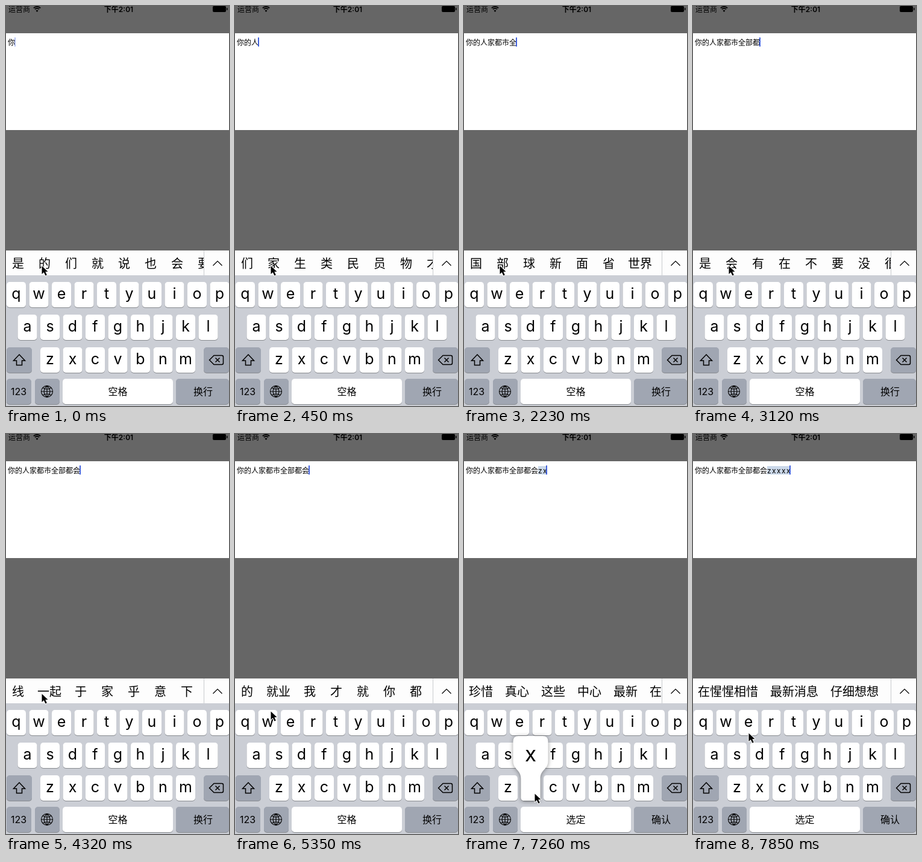
Write an HTML page with a canvas that moves like this. It is 370 by 661 pixels and loops after 8000 ms.

```html
<!DOCTYPE html>
<html lang="zh-CN">
<head>
<meta charset="utf-8">
<style>
html, body { margin: 0; width: 100%; height: 100%; overflow: hidden; background: #666; }
canvas { display: block; }
</style>
</head>
<body>
<canvas id="stage" width="370" height="661"></canvas>
<script>
const c = document.getElementById('stage').getContext('2d');
const LOOP = 8000;
const CJK = '"Noto Sans CJK SC", "Noto Sans CJK", sans-serif';
const LATIN = 'Inter, sans-serif';

// [time, committed characters, pinyin, candidates]
const PHRASE = '你的人家都市全部都会';
const typing = [
  [0, 1, '', '是 的 们 就 说 也 会 要'],
  [150, 2, '', '时候 人 心 话 手 事 家 生活'],
  [450, 3, '', '们 家 生 类 民 员 物 才'],
  [890, 4, '', '的 都 说 是 就 在 不 也'],
  [1190, 5, '', '会 市 江堰 匀 城 市报 灵'],
  [1790, 6, '', '的 全 里 中 生活 区 人'],
  [2080, 7, '', ''],
  [2230, 7, '', '国 部 球 新 面 省 世界'],
  [2680, 8, '', '的 都 是 人 在 内容 门'],
  [3120, 9, '', '是 会 有 在 不 要 没 很'],
  [3720, 10, '', '是 会 有 在 不 要 没 很'],
  [3870, 10, '', '的 在 有 是 被 让 不 很'],
  [4320, 10, '', '线 一起 于 家 乎 意 下'],
  [4610, 10, '', ''],
  [4760, 10, '', '的 就业 我 才 就 你 都'],
  [6820, 10, 'z', '在 这 中 只 最 做 怎么 真'],
  [7260, 10, 'zx', '珍惜 真心 这些 中心 最新 在下'],
  [7400, 10, 'zxx', '在学校 中学校 最新型 怎么写'],
  [7550, 10, 'zxxx', '最新消息 在线学习 仔细想想'],
  [7700, 10, 'zxxxx', '在惺惺相惜 最新消息 仔细想想']
];
// [time, x, y]
const pointer = [
  [0, 59, 429], [5210, 59, 458], [5360, 60, 520], [5500, 61, 580], [5650, 62, 612],
  [5790, 63, 621], [6090, 66, 614], [6240, 70, 598], [6530, 72, 591],
  [7110, 117, 594], [7850, 92, 494]
];
// [time, caret opacity]
const caret = [[0, .4], [150, 1], [5360, .4], [5790, 1], [6240, .4], [6530, 1], [6680, .4], [6820, 1]];
// [time, pressed key]
const pressed = [[0, ''], [6820, 'z'], [6970, ''], [7260, 'x'], [7850, '']];

const at = (list, t) => list.findLast(row => row[0] <= t);

function rect(x, y, w, h, fill) {
  c.fillStyle = fill;
  c.fillRect(x, y, w, h);
}

function text(s, x, y, size, family = CJK, align = 'center', weight = 400) {
  c.fillStyle = '#000';
  c.font = `${weight} ${size}px ${family}`;
  c.textAlign = align;
  c.fillText(s, x, y);
}

function stroke(d, width = 1.5) {
  c.strokeStyle = '#000';
  c.lineWidth = width;
  c.stroke(new Path2D(d));
}

function roundRect(x, y, w, h, r, fill) {
  c.fillStyle = fill;
  c.beginPath();
  c.roundRect(x, y, w, h, r);
  c.fill();
}

function key(x, y, w, fill = '#fff') {
  roundRect(x, y + 1, w, 42, 5, '#888b90');
  roundRect(x, y, w, 42, 5, fill);
}

function statusBar() {
  text('运营商', 4, 9.5, 12, CJK, 'left');
  text('下午2:01', 187, 9.5, 12, `Inter, ${CJK}`, 'center', 600);
  c.strokeStyle = '#000';
  c.lineWidth = 1.8;
  for (const r of [8, 5]) {
    c.beginPath();
    c.arc(51.5, 9, r, -Math.PI * .75, -Math.PI * .25);
    c.stroke();
  }
  c.fillStyle = '#000';
  c.fill(new Path2D('M51.5 10L49.5 7.6Q51.5 6 53.5 7.6Z'));
  roundRect(343, 0, 22, 10, 2, '#000');
  roundRect(366, 3, 1.5, 4, 1, '#000');
}

function field(t, count, pinyin) {
  rect(0, 45, 370, 160, '#fff');
  text(PHRASE.slice(0, count), 3, 64.5, 12, CJK, 'left');
  let end = 3 + count * 12;
  if (pinyin) {
    const w = pinyin.length * 8 - 2;
    rect(end, 53, w, 14, '#cbd8e9');
    [...pinyin].forEach((ch, i) => text(ch, end + i * 8, 64.5, 12, LATIN, 'left'));
    end += w;
  }
  c.globalAlpha = at(caret, t)[1];
  rect(end - 1, 52, 2, 15, '#4262dc');
  c.globalAlpha = 1;
}

function candidateBar(words) {
  rect(0, 404, 370, 41, '#fdfdfd');
  if (!words) return;
  c.save();
  c.beginPath();
  c.rect(0, 404, 328, 41);
  c.clip();
  let x = -2;
  for (const word of words.split(' ')) {
    const w = Math.max(44, word.length * 20 + 20);
    text(word, x + w / 2, 432.5, 20);
    x += w;
  }
  c.restore();
  rect(328, 404, 1, 41, '#c8cacd');
  stroke('M343.5 429L351 421.5L358.5 429', 1.2);
}

function popup(x, label) {
  const mid = x + 16;
  c.save();
  c.translate(mid, 0);
  c.shadowColor = 'rgba(0,0,0,.4)';
  c.shadowBlur = 7;
  c.shadowOffsetY = 1;
  c.fillStyle = '#fff';
  c.fill(new Path2D('M-20 499H20Q29 499 29 508V540C29 555 16 554 16 570V601Q16 606 11 606' +
    'H-11Q-16 606 -16 601V570C-16 554 -29 555 -29 540V508Q-29 499 -20 499Z'));
  c.restore();
  text(label, mid, 541, 35, LATIN);
}

function keyboard(t, composing) {
  const gray = '#a0a6b2', down = at(pressed, t)[1];
  let pop;
  rect(0, 445, 370, 216, '#cbced5');
  [['qwertyuiop', 1, 456], ['asdfghjkl', 19.5, 510], ['zxcvbnm', 57, 564]].forEach(([row, left, y]) => {
    [...row].forEach((ch, i) => {
      const x = left + i * 37.5;
      key(x, y, 32);
      if (ch === down) pop = x;
      else text(ch, x + 16, y + 28, 25, LATIN);
    });
  });
  key(1, 564, 42, gray);
  key(328, 564, 42, gray);
  key(1, 616, 41, gray);
  key(48, 616, 41, gray);
  key(94, 616, 183);
  key(282, 616, 88, gray);
  stroke('M22 576L31.5 586H26.5V593.5H17.5V586H12.5Z');
  stroke('M345 577.5H358Q360.5 577.5 360.5 580V590Q360.5 592.5 358 592.5H345L337.5 585Z' +
    'M347.5 581.5L354.5 588.5M354.5 581.5L347.5 588.5');
  stroke('M58.5 637a9.5 9.5 0 1 0 19 0a9.5 9.5 0 1 0 -19 0H77.5M68 627.5V646.5' +
    'M68 627.5C61.5 633 61.5 641 68 646.5C74.5 641 74.5 633 68 627.5' +
    'M61 631Q68 635 75 631M61 643Q68 639 75 643', 1.1);
  text('123', 21, 643, 16, LATIN);
  text(composing ? '选定' : '空格', 185.5, 643, 16);
  text(composing ? '确认' : '换行', 327, 643, 16);
  if (down) popup(pop, down);
}

function arrow(x, y) {
  c.save();
  c.translate(x, y);
  const shape = new Path2D('M.5 .5V14L3.8 11L6.4 16.5L8.8 15.4L6.3 10H10.5Z');
  c.lineJoin = 'round';
  c.strokeStyle = '#fff';
  c.lineWidth = 2;
  c.stroke(shape);
  c.fillStyle = '#000';
  c.fill(shape);
  c.restore();
}

function draw(now) {
  const t = now % LOOP;
  const [, count, pinyin, words] = at(typing, t);
  rect(0, 0, 370, 661, '#666');
  statusBar();
  field(t, count, pinyin);
  candidateBar(words);
  keyboard(t, pinyin);
  arrow(...at(pointer, t).slice(1));
  requestAnimationFrame(draw);
}
requestAnimationFrame(draw);
</script>
</body>
</html>
```
